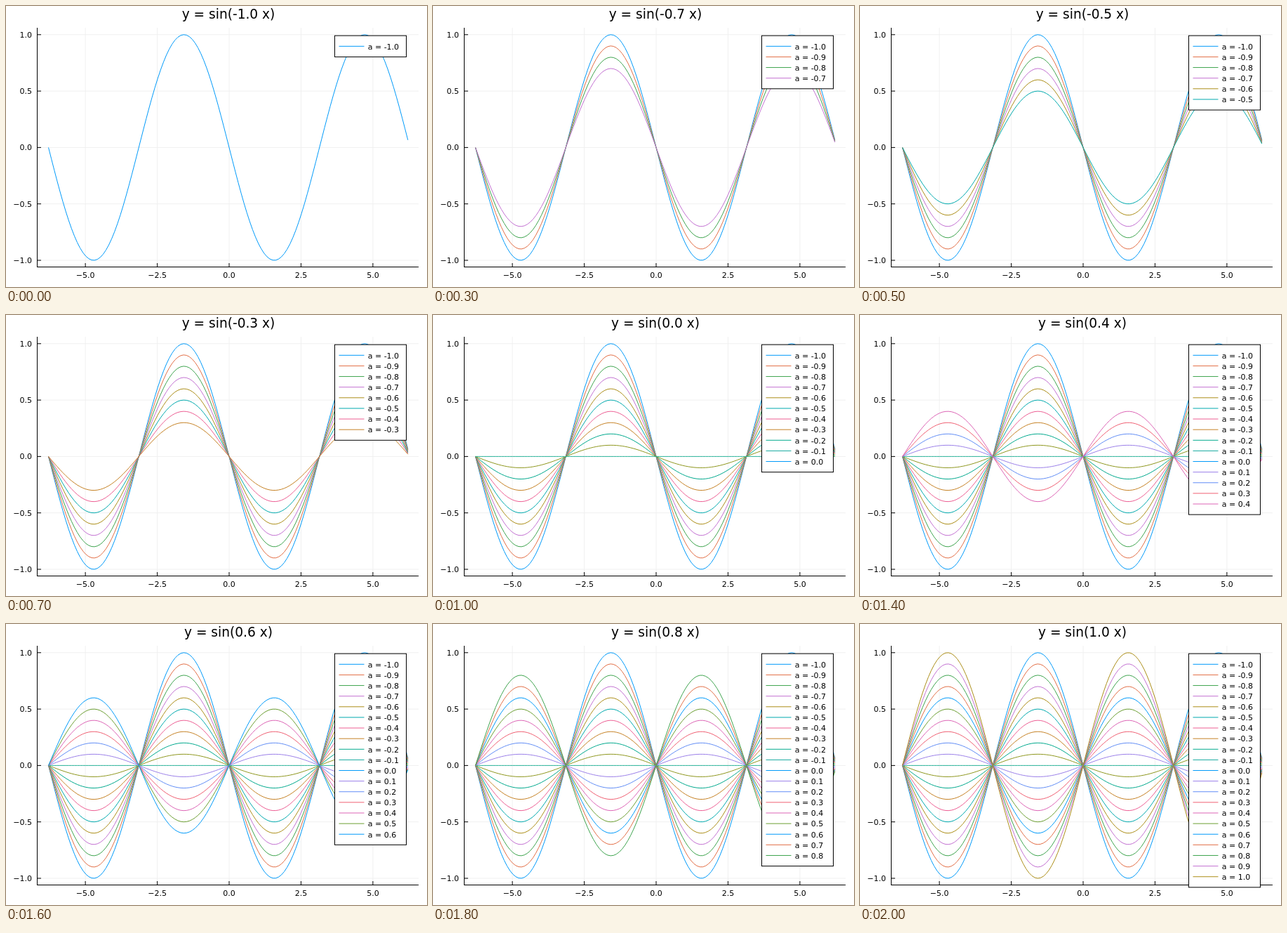
An HTML page that plays this animation: 600 by 400 pixels, repeating every 2100 ms.

```html
<!DOCTYPE html>
<html lang="en">
<head>
<meta charset="utf-8">
<title>Sine family</title>
<style>
  html, body { margin: 0; width: 100%; height: 100%; overflow: hidden; background: #fff; }
  svg { display: block; width: 600px; height: 400px; }
  text { font: 11px "DejaVu Sans", sans-serif; fill: #000; }
  #title { font-size: 18.6px; }
  path, line { fill: none; stroke-width: 1; }
</style>
</head>
<body>
<svg id="stage" viewBox="0 0 600 400" xmlns="http://www.w3.org/2000/svg"></svg>
<script>
const STEPS = 21, STEP_MS = 100;
const COLORS = ['#009afa', '#e36f47', '#3ea44e', '#c371d2', '#ac8e18', '#00aaae', '#ed5e93', '#c68225',
  '#00a98d', '#8e971e', '#2bb59b', '#9b7fe9', '#618df6', '#f06073', '#dd65b6', '#6c9f33'];
const KEY_COLORS = { 9: '#17ab9f', 10: '#009afa' };
const AXIS = { left: 44.5, right: 588, top: 31, bottom: 371.5 };
const KEY = { x: 468.5, y: 42.2, width: 102, row: 15.12 };

const stage = document.getElementById('stage');
const px = x => 318 + 40.98 * x;
const py = y => 201.4 - 160.6 * y;

function add(parent, tag, attrs, text) {
  const el = document.createElementNS('http://www.w3.org/2000/svg', tag);
  for (const name in attrs) el.setAttribute(name, attrs[name]);
  if (text) el.textContent = text;
  parent.appendChild(el);
  return el;
}
const line = (parent, x1, y1, x2, y2, stroke) => add(parent, 'line', { x1, y1, x2, y2, stroke });
const label = (parent, x, y, anchor, text) => add(parent, 'text', { x, y, 'text-anchor': anchor }, text);
const tickText = v => v.toFixed(1).replace('-', '\u2212');

const xTicks = [-5, -2.5, 0, 2.5, 5];
const yTicks = [-1, -0.5, 0, 0.5, 1];

// Grid
for (const v of xTicks) line(stage, px(v), AXIS.top, px(v), AXIS.bottom, '#f0f0f0');
for (const v of yTicks) line(stage, AXIS.left, py(v), AXIS.right, py(v), '#f0f0f0');

// Axes with inward ticks
line(stage, AXIS.left, AXIS.top, AXIS.left, AXIS.bottom + 0.5, '#000');
line(stage, AXIS.left, AXIS.bottom, AXIS.right, AXIS.bottom, '#000');
for (const v of xTicks) {
  line(stage, px(v), AXIS.bottom, px(v), AXIS.bottom - 5.5, '#000');
  label(stage, px(v), 387, 'middle', tickText(v));
}
for (const v of yTicks) {
  line(stage, AXIS.left, py(v), AXIS.left + 5.5, py(v), '#000');
  label(stage, 37, py(v) + 4, 'end', tickText(v));
}

const title = label(stage, 317, 18, 'middle', ' ');
title.id = 'title';

function curve(a) {
  let d = '';
  for (let i = 0; i <= 125; i++) {
    const x = -2 * Math.PI + i / 10;
    d += (i ? 'L' : 'M') + px(x).toFixed(2) + ' ' + py(a * Math.sin(x)).toFixed(2);
  }
  return d;
}

const curves = add(stage, 'g', {});
const key = add(stage, 'g', {});
const box = add(key, 'rect', { x: KEY.x, y: KEY.y, width: KEY.width, height: 30, fill: '#fff', stroke: '#000' });

const amplitude = i => (i - 10) / 10;
const series = Array.from({ length: STEPS }, (_, i) => {
  const a = amplitude(i), color = COLORS[i % COLORS.length];
  const y = KEY.y + KEY.row * (i + 1);
  const row = add(key, 'g', {});
  line(row, 474.5, y, 510.5, y, KEY_COLORS[i] || color);
  label(row, 515.7, y + 4.3, 'start', 'a = ' + a.toFixed(1));
  return [add(curves, 'path', { d: curve(a), stroke: color, 'stroke-linejoin': 'round' }), row];
});

let shown = -1;
function show(step) {
  if (step === shown) return;
  shown = step;
  title.textContent = `y = sin(${amplitude(step).toFixed(1)} x)`;
  box.setAttribute('height', KEY.row * (step + 2));
  series.forEach((parts, i) => {
    for (const part of parts) part.style.display = i <= step ? '' : 'none';
  });
}

const start = performance.now();
function tick() {
  const t = Math.max(0, performance.now() - start);
  show(Math.floor(t / STEP_MS) % STEPS);
  requestAnimationFrame(tick);
}
tick();
</script>
</body>
</html>
```
